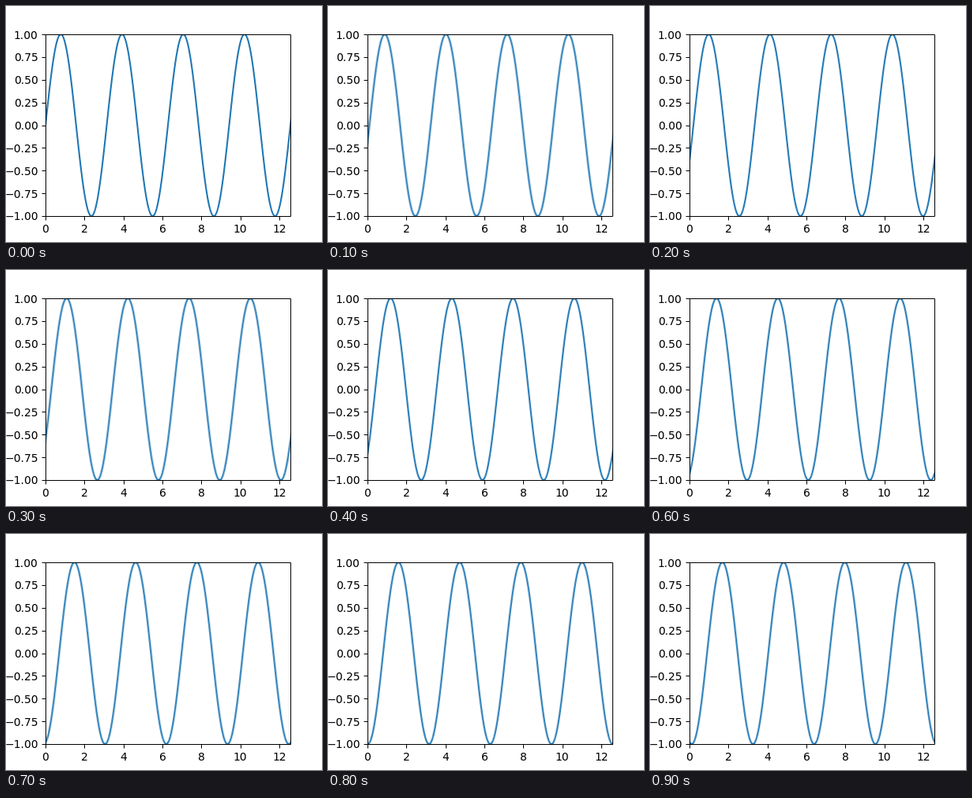
Animation, 400 px wide and 300 px high, one loop 1000 ms. Source, as an HTML page:

```html
<!DOCTYPE html>
<html lang="en">
<head>
<meta charset="utf-8">
<title>Travelling sine wave</title>
<style>
  html, body { margin: 0; width: 100%; height: 100%; overflow: hidden; background: #fff; }
  #plot { display: block; width: 400px; height: 300px; }
  #axes path { fill: none; stroke: #000; stroke-width: 1; }
  text { font: 13.889px "DejaVu Sans", sans-serif; fill: #000; }
  /* ten phase steps of 0.1 x-units, 2.4669px each */
  #curve {
    fill: none; stroke: #1f77b4; stroke-width: 2.083; stroke-linejoin: round;
    animation: travel 1s steps(10, end) infinite;
  }
  @keyframes travel {
    from { transform: translateX(0); }
    to { transform: translateX(24.669px); }
  }
</style>
</head>
<body>
<svg id="plot" viewBox="0 0 400 300" width="400" height="300">
  <clipPath id="area"><rect x="50" y="36" width="311" height="232"/></clipPath>
  <g clip-path="url(#area)"><path id="curve"/></g>
  <g id="axes"></g>
</svg>
<script>
  const NS = "http://www.w3.org/2000/svg";
  const DIGIT = 8.837; // advance of one digit
  const axes = document.getElementById("axes");
  const px = x => 50 + x * 310 / (4 * Math.PI);
  const py = y => 151.5 - y * 115.5;
  const snap = v => Math.floor(v + 0.5) + 0.5;

  function add(tag, attrs, text) {
    const el = document.createElementNS(NS, tag);
    for (const key in attrs) el.setAttribute(key, attrs[key]);
    if (text !== undefined) el.textContent = text;
    axes.appendChild(el);
  }

  const line = d => add("path", { d });

  // Labels start on a whole pixel; the rest sits one pixel tighter to the first glyph
  const label = (text, x, y) => add("text", { x, y, dx: "0 -1" }, text);

  // The curve starts left of the axes so that shifting it never shows a gap
  const points = [];
  for (let x = -1.2; x < 12.8; x += 0.02) {
    points.push(px(x).toFixed(3) + " " + py(Math.sin(2 * x)).toFixed(3));
  }
  document.getElementById("curve").setAttribute("d", "M" + points.join("L"));

  for (let x = 0; x <= 12; x += 2) {
    const text = String(x);
    line(`M${snap(px(x))} 267.5v5`);
    label(text, Math.ceil(px(x) - text.length * DIGIT / 2), 288);
  }

  const left = { "0": 11, "1": 10, "\u2212": -1 };
  for (let i = -4; i <= 4; i++) {
    const y = py(i / 4);
    const text = (i < 0 ? "\u2212" : "") + Math.abs(i / 4).toFixed(2);
    line(`M50.5 ${snap(y)}h-5`);
    label(text, left[text[0]], Math.round(y + (i < 0 ? 5.45 : 5.5)));
  }

  line("M50.5 36.5H360.5V267.5H50.5Z");
</script>
</body>
</html>
```
